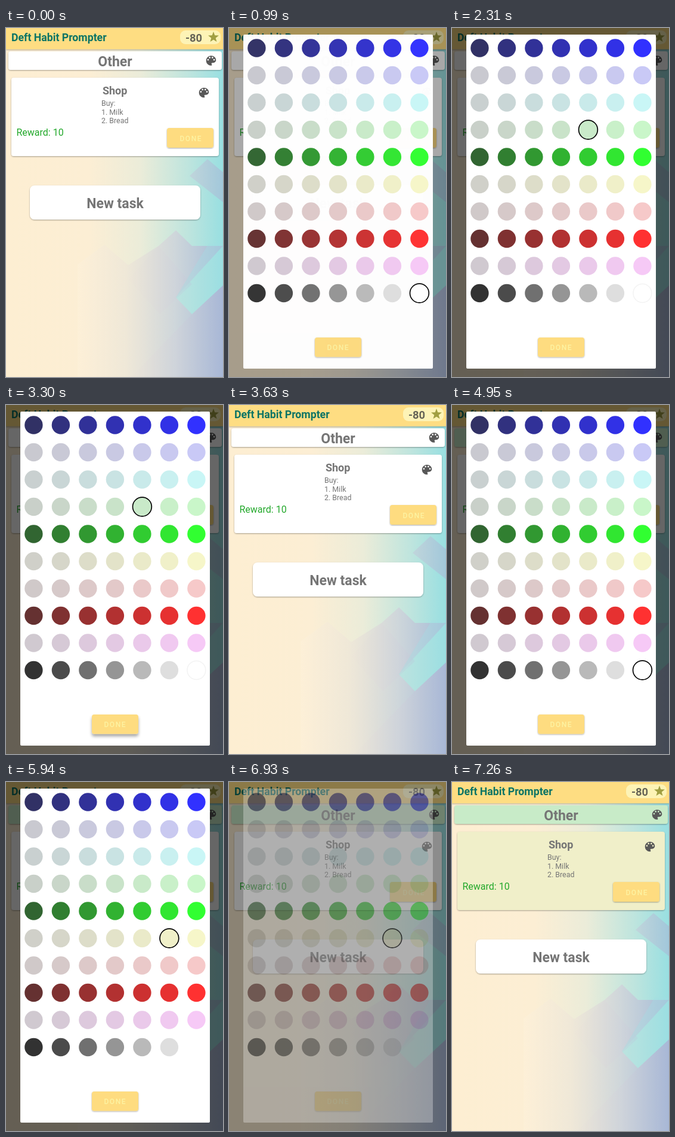
Animation, 364 px wide and 583 px high, one loop 9.9 s. Source, as an HTML page:

```html
<!DOCTYPE html>
<html lang="en">
<head>
<meta charset="utf-8">
<title>Task colours</title>
<style>
  html, body { margin: 0; width: 100%; height: 100%; overflow: hidden; }
  svg { display: block; width: 100%; height: 100%; font-family: Roboto, sans-serif; }
  .bold { font-weight: 700; fill: #757575; }
  .mid { text-anchor: middle; }
  .label { font-size: 12px; font-weight: 500; letter-spacing: 1.5px; fill: #fdf3a2; }
  .icon { fill: #585858; }
</style>
</head>
<body>
<svg viewBox="0 0 364 583">
  <defs>
    <linearGradient id="sky">
      <stop offset="0" stop-color="#fdeed2"/>
      <stop offset=".38" stop-color="#fceed4"/>
      <stop offset=".62" stop-color="#ebecd9"/>
      <stop offset=".85" stop-color="#bce4de"/>
      <stop offset="1" stop-color="#98dfe1"/>
    </linearGradient>
    <linearGradient id="lilac" gradientUnits="userSpaceOnUse" x1="0" x2="364">
      <stop offset=".33" stop-color="#fdf0d8"/>
      <stop offset=".55" stop-color="#efe7d8"/>
      <stop offset=".78" stop-color="#cfd2da"/>
      <stop offset="1" stop-color="#a9b4d5"/>
    </linearGradient>
    <filter id="soft" x="-10%" y="-20%" width="120%" height="150%">
      <feDropShadow dx="0" dy="1" stdDeviation="1" flood-opacity=".35"/>
    </filter>
    <filter id="lift" x="-20%" y="-30%" width="140%" height="190%">
      <feDropShadow dx="0" dy="4" stdDeviation="2.8" flood-opacity=".35"/>
    </filter>
    <path id="palette" transform="scale(.92) translate(-12 -12)" d="M12 3c-4.97 0-9 4.03-9 9s4.03 9 9 9c.83 0 1.5-.67 1.5-1.5 0-.39-.15-.74-.39-1.01-.23-.26-.38-.61-.38-.99 0-.83.67-1.5 1.5-1.5H16c2.76 0 5-2.24 5-5 0-4.42-4.03-8-9-8zm-5.5 9a1.5 1.5 0 1 1 0-3 1.5 1.5 0 0 1 0 3zm3-4a1.5 1.5 0 1 1 0-3 1.5 1.5 0 0 1 0 3zm5 0a1.5 1.5 0 1 1 0-3 1.5 1.5 0 0 1 0 3zm3 4a1.5 1.5 0 1 1 0-3 1.5 1.5 0 0 1 0 3z"/>
  </defs>

  <rect width="364" height="583" fill="url(#sky)"/>
  <g fill="url(#lilac)">
    <path d="M338 219L364 241V291L308 247Z" opacity=".55"/>
    <path d="M256 364L285 338L312 364H364L285 450L312 478L364 430V583H120V395L165 362L205 396Z" opacity=".8"/>
    <path d="M256 364L312 428L258 478L205 420Z" opacity=".5"/>
    <path d="M312 478L364 430V583H210Z" opacity=".6"/>
  </g>
  <path d="M364 360H340L285 450L312 478L364 430Z" fill="#a0dde2" opacity=".35"/>

  <rect width="364" height="35.5" fill="#fedd82" filter="url(#soft)"/>
  <text class="bold" x="9" y="22" font-size="17.7" style="fill:#0b7465">Deft Habit Prompter</text>
  <rect x="292" y="4" width="68" height="23" rx="9" fill="#fdf3b6"/>
  <text class="bold mid" x="315" y="22.5" font-size="18.3" style="fill:#666456">-80</text>
  <path id="star" fill="#a19f42"/>

  <g filter="url(#soft)"><rect id="header" x="4" y="39" width="358" height="31" rx="4"/></g>
  <text class="bold mid" x="183" y="63.5" font-size="23">Other</text>
  <use class="icon" href="#palette" x="344" y="54.5"/>

  <g filter="url(#soft)"><rect id="card" x="9" y="83" width="348" height="131" rx="4"/></g>
  <text class="bold mid" x="182.700" y="111" font-size="18">Shop</text>
  <use class="icon" href="#palette" x="332" y="108"/>
  <g font-size="12.4" fill="#757575">
    <text x="160" y="130">Buy:</text>
    <text x="160" y="144.500">1. Milk</text>
    <text x="160" y="159">2. Bread</text>
  </g>
  <text x="17.500" y="179.500" font-size="16" fill="#22a82a">Reward: 10</text>
  <rect x="270" y="167" width="78" height="33" rx="4" fill="#fedc80" filter="url(#soft)"/>
  <text class="label" x="291.500" y="188.500">DONE</text>

  <rect x="40" y="263" width="286" height="57" rx="8" fill="#fff" filter="url(#soft)"/>
  <text class="bold mid" x="183" y="300.500" font-size="23">New task</text>

  <rect id="dim" width="364" height="583"/>
  <g id="dialog">
    <rect x="24" y="11" width="318" height="558" rx="2" fill="#fff"/>
    <rect id="button" x="144" y="517" width="78" height="32.500" rx="4" fill="#fedc80"/>
    <text class="label" x="164.500" y="538">DONE</text>
  </g>
  <g id="swatches"></g>
  <circle id="trace" r="15.500" fill="none" stroke="#f3f3f3" stroke-width="1.500"/>
  <circle id="ring" r="15.900" fill="none" stroke="#000" stroke-width="1.700"/>
</svg>
<script>
const LOOP = 9900;
const $ = id => document.getElementById(id);
const set = (id, attrs) => {
  for (const k in attrs) $(id).setAttribute(k, attrs[k]);
};
const at = (col, row) => ({ cx: 46.4 + 45.5 * col, cy: 33.5 + 45.5 * row });

// Each row: channels that brighten with the column, and whether it is pale.
const ROWS = [
  ['b', 0], ['b', 1], ['gb', 1], ['g', 1], ['g', 0],
  ['rg', 1], ['r', 1], ['r', 0], ['rb', 1]
];
const GREYS = [50, 75, 112, 149, 185, 222, 255];

function colour(col, row) {
  if (row === 9) return `rgb(${GREYS[col]},${GREYS[col]},${GREYS[col]})`;
  const [bright, pale] = ROWS[row];
  const low = pale ? 201 : 49;
  const high = pale ? 208 + 6.4 * col : 101 + 25.7 * col;
  return `rgb(${[...'rgb'].map(c => Math.round(bright.includes(c) ? high : low))})`;
}

for (let row = 0; row < 10; row++) {
  for (let col = 0; col < 7; col++) {
    const dot = document.createElementNS($('swatches').namespaceURI, 'circle');
    const attrs = { ...at(col, row), r: 15.2, fill: colour(col, row) };
    for (const k in attrs) dot.setAttribute(k, attrs[k]);
    $('swatches').append(dot);
  }
}

const points = Array.from({ length: 10 }, (_, i) => {
  const r = i % 2 ? 3.9 : 9.4, a = (i / 5 - 0.5) * Math.PI;
  return `${348 + r * Math.cos(a)} ${15.5 + r * Math.sin(a)}`;
});
set('star', { d: `M${points.join('L')}Z` });

const WHITE = [6, 9], GREEN = [4, 3], YELLOW = [5, 5];
const STEPS = [
  { t: 0 },
  { t: 990, dim: 0.34, show: 0.985, pick: WHITE },
  { t: 1320, dim: 0.6, show: 1, pick: WHITE },
  { t: 2310, dim: 0.6, show: 1, pick: GREEN },
  { t: 3300, dim: 0.6, show: 1, pick: GREEN, pressed: true },
  { t: 3630 },
  { t: 3960 },
  { t: 4950, dim: 0.6, show: 1, pick: WHITE },
  { t: 5940, dim: 0.6, show: 1, pick: YELLOW },
  { t: 6930, dim: 0.45, show: 0.3, pick: YELLOW, fading: true },
  { t: 7260 }
];

function render(t) {
  const { dim = 0, show = 0, pick = WHITE, pressed, fading } = STEPS.findLast(s => t >= s.t);
  set('header', { fill: t >= 3960 ? '#c8ebc8' : '#fff' });
  set('card', { fill: t >= 7260 ? '#f0efc9' : '#fff' });
  set('dim', { opacity: dim });
  set('dialog', { opacity: show });
  set('button', { filter: pressed ? 'url(#lift)' : 'url(#soft)' });
  set('swatches', {
    opacity: fading ? 0.6 : show,
    style: `mix-blend-mode:${fading ? 'multiply' : 'normal'}`
  });
  set('trace', { ...at(...WHITE), opacity: show && pick === GREEN ? 1 : 0 });
  set('ring', { ...at(...pick), opacity: fading ? 0.7 : show });
}

const start = performance.now();
function tick() {
  render((performance.now() - start) % LOOP);
  requestAnimationFrame(tick);
}
tick();
</script>
</body>
</html>
```
